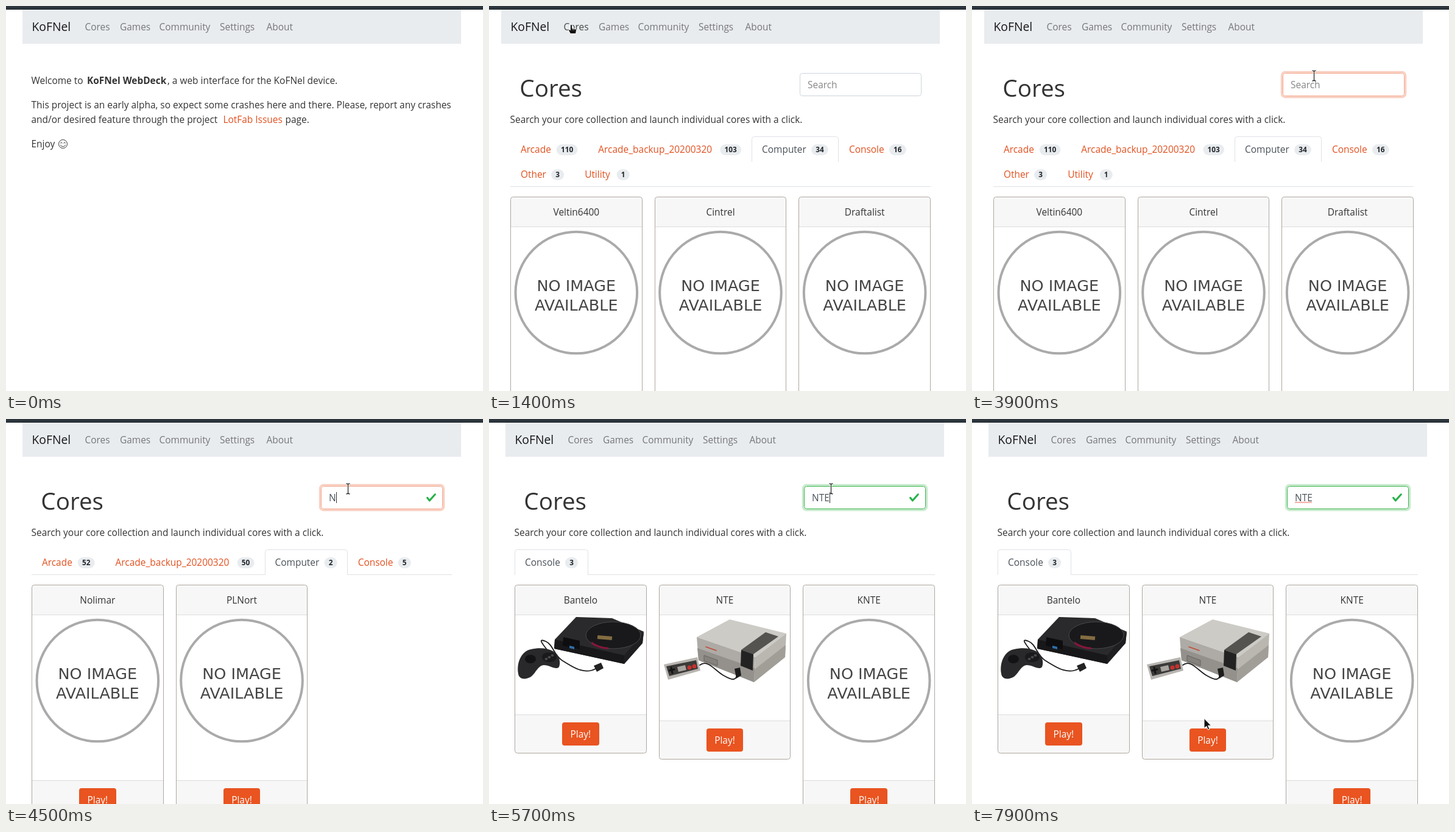
Recreate the animation shown at these times as an HTML page. Size 783x632 px, loop 8000 ms.

```html
<!DOCTYPE html>
<html lang="en">
<head>
<meta charset="utf-8">
<title>Web menu demo</title>
<style>
  html, body { margin: 0; width: 100%; height: 100%; overflow: hidden; background: #fff; }
  svg { display: block; width: 783px; height: 632px; }
  text { font: 15.45px "Open Sans", "Noto Sans", sans-serif; fill: #333; white-space: pre; }
  .mid { text-anchor: middle; }
  .brand { font-size: 19.3px; fill: #151618; }
  .nav { fill: #757678; }
  .title { font-size: 38.6px; }
  .bold { font-weight: 700; }
  .link { fill: #e2501f; }
  .tab { fill: #495057; }
  .badge { font-size: 11.8px; font-weight: 700; fill: #212529; }
  .none { font: 25.5px "DejaVu Sans", sans-serif; fill: #444; }
  .play { fill: #fff; }
  .field { fill: #495057; }
  .hint { fill: #868686; }
</style>
</head>
<body>
<svg id="stage" viewBox="0 0 783 632" xmlns="http://www.w3.org/2000/svg"></svg>
<script>
const LOOP = 8000, STEP = 100;
const ORANGE = [244, 170, 144], GREEN = [56, 180, 74], GREY = [206, 212, 218];
const GLOW = [233, 84, 32];

const text = (x, y, str, cls = '') => `<text x="${x}" y="${y}" class="${cls}">${str}</text>`;
const rect = (x, y, w, h, fill, more = '') =>
  `<rect x="${x}" y="${y}" width="${w}" height="${h}" fill="${fill}" ${more}/>`;
const path = (d, fill, more = '') => `<path d="${d}" fill="${fill}" ${more}/>`;
const line = (d, color, width) =>
  path(d, 'none', `stroke="${color}" stroke-width="${width}" stroke-linecap="round" stroke-linejoin="round"`);
const oval = (x, y, rx, ry, fill, more = '') =>
  `<ellipse cx="${x}" cy="${y}" rx="${rx}" ry="${ry}" fill="${fill}" ${more}/>`;

// All page coordinates below are relative to the left edge of the container.

function navBar() {
  const items = [['Games', 160], ['Community', 224.5], ['Settings', 324], ['About', 400.5]];
  return rect(0, 6, 720, 56, '#e9ecef') + text(15.5, 41, 'KoFNel', 'brand') +
    '<text id="cores" x="102.5" y="40" class="nav">Cores</text>' +
    items.map(([name, x]) => text(x, 40, name, 'nav')).join('');
}

function homePage() {
  return text(14.5, 128, 'Welcome to') + text(106, 128, 'KoFNel WebDeck', 'bold') +
    text(238, 128, ', a web interface for the KoFNel device.') +
    text(14.5, 168, 'This project is an early alpha, so expect some crashes here and there. Please, report any crashes') +
    text(14.5, 192, 'and/or desired feature through the project') +
    text(329.5, 192, 'LotFab Issues', 'link') + text(431.5, 192, 'page.') +
    text(14.5, 232, 'Enjoy') +
    oval(66.5, 226.5, 7, 7, 'none', 'stroke="#333"') +
    line('M62.3 225q1.5-2.4 3 0M67.7 225q1.5-2.4 3 0M62.3 228.3q4.2 5.4 8.4 0', '#333', 1);
}

// Distance from the start of a tab's label to its badge
const LABELS = { Arcade: 58.7, Arcade_backup_20200320: 200, Computer: 81, Console: 66, Other: 50, Utility: 52.5 };

function tabs(list, active) {
  let x = 32, row = 0, out = '', box = '';
  for (const [name, count] of list) {
    const gap = LABELS[name], w = 14.4 + 6.75 * String(count).length;
    if (x + gap + w + 17 > 705) { x = 32; row++; }
    const y = 214 + 41 * row, on = name === active;
    if (on) {
      const l = Math.round(x - 17) + 0.5, r = Math.round(x + gap + w + 16) + 0.5;
      box = path(`M${l} ${y + 42}V${y + 4.5}q0-4 4-4H${r - 4}q4 0 4 4V${y + 42}`, '#fff', 'stroke="#dee2e6"');
    }
    out += text(x, y + 27, name, on ? 'tab' : 'link') +
      rect(x + gap, y + 13, w, 18, '#e9ecef', 'rx="9"') +
      text(x + gap + w / 2, y + 26.3, count, 'badge mid');
    x += gap + w + 34;
  }
  const base = 255 + 41 * row;
  return { base, svg: rect(15, base, 690, 1, '#dee2e6') + box + out };
}

function noImage(cx, top) {
  return oval(cx, top + 157.5, 99.8, 99.8, '#fff', 'stroke="#aaa" stroke-width="4"') +
    text(cx, top + 154.5, 'NO IMAGE', 'none mid') + text(cx, top + 186.5, 'AVAILABLE', 'none mid');
}

function darkConsole() {
  return path('M116 325L175 327L227 349L225 368L195 402L80 377L81 362Z', '#2a2a2c') +
    path('M81 362L195 388L195 402L80 377Z', '#18181a') +
    path('M195 388L227 350L225 368L195 402Z', '#1f1f21') +
    oval(177, 355, 45, 22, '#19191b', 'stroke="#48484c"') +
    path('M141 365Q152 374 169 375V378Q153 377 142 370Z', '#86163c') +
    rect(151, 356, 24, 6, '#846c42', 'transform="rotate(5 163 359)"') +
    path('M95 358l27 6v14l-28-6z', '#0e0e10') + path('M105 372l8 2v4l-8-2z', '#2d6fad') +
    line('M70 381C58 366 54 360 66 365S80 389 94 397S128 421 148 410', '#1b1b1d', 1.8) +
    path('M145 405l12-5 4 9-11 6z', '#222') +
    path('M21 418C18 400 26 381 42 378C55 375 69 376 78 381C89 387 91 400 88 407C83 413 73 404 63 404C53 405 50 417 42 423C32 429 22 427 21 418Z', '#29292b') +
    oval(41, 394, 9, 7, '#131315') + oval(72, 391, 12, 8, '#1a1a1c') +
    oval(67, 394, 2.5, 2, '#4a4a4e') + oval(72, 391, 2.5, 2, '#4a4a4e') + oval(77, 388, 2.5, 2, '#4a4a4e');
}

function greyConsole() {
  return path('M314 358L368 329L461 352L410 391Z', '#cdcbc6') +
    path('M314 358L410 391L408 432L317 396Z', '#aeaba6') +
    path('M410 391L461 352L459 391L408 432Z', '#bab7b1') +
    path('M315 376L409 409L408 432L317 396Z', '#94918c') +
    path('M409 411L460 371L459 391L408 432Z', '#a19e98') +
    path('M427 350L448 357L407 386L387 379Z', '#55534f') +
    path('M387 379L407 386L406 413L386 405Z', '#222') +
    path('M326 388l22 8v9l-22-8z', '#85827d', 'stroke="#66635f" stroke-width="1"') +
    line('M329 374l17 6', '#c04a3a', 1.6) +
    line('M319 404C332 394 344 413 358 421S379 431 381 417', '#1e1e1e', 1.8) +
    path('M376 410l9-2 2 13-8 5z', '#1d1d1d') +
    path('M260 403L315 391L320 413L267 428Z', '#b8b5b1') +
    path('M264 406L313 396L316 410L269 422Z', '#3b3a39') +
    line('M272 408l2 9M269 413l8-2', '#151515', 3) +
    path('M282 407l13-3 2 8-13 3z', '#a7a4a0') +
    oval(302, 408, 3.5, 3.5, '#c5322e') + oval(310, 406, 3.5, 3.5, '#c5322e');
}

const PHOTOS = { Bantelo: [213, darkConsole], NTE: [223, greyConsole] };

function card(name, i, top, left) {
  const start = 15 + 710 / 3 * i, width = 650 / 3, cx = start + width / 2;
  // Edges sit on whole pixels of the stage
  const snap = x => Math.round(x + left) - left;
  const x = snap(start), w = snap(start + width) - x;
  const [foot, photo] = PHOTOS[name] || [321, () => noImage(cx, top)];
  const height = foot + 64, inner = w - 10;
  const playX = snap(cx - 30.2), playW = snap(cx + 30.2) - playX;
  return rect(x + 0.5, top + 0.5, w - 1, height - 1, '#fff', 'rx="4"') +
    path(`M${x + 1} ${top + 49}v-44q0-4 4-4h${inner}q4 0 4 4v44z`, '#f7f7f7') +
    path(`M${x + 1} ${top + foot}v59q0 4 4 4h${inner}q4 0 4-4v-59z`, '#f7f7f7') +
    rect(x + 1, top + 49, w - 2, 1, '#dcdcdc') + rect(x + 1, top + foot, w - 2, 1, '#dcdcdc') +
    photo() + text(cx, top + 31, name, 'mid') +
    rect(playX, top + foot + 13, playW, 38, '#e95420', 'rx="4"') +
    text(cx, top + foot + 38, 'Play!', 'play mid') +
    rect(x + 0.5, top + 0.5, w - 1, height - 1, 'none', 'rx="4" stroke="#aea79f"');
}

const VIEWS = [
  { at: 0, left: 27 },
  { at: 1400, left: 20, active: 'Computer', cards: ['Veltin6400', 'Cintrel', 'Draftalist'],
    tabs: [['Arcade', 110], ['Arcade_backup_20200320', 103], ['Computer', 34], ['Console', 16], ['Other', 3], ['Utility', 1]] },
  { at: 4500, left: 27, active: 'Computer', cards: ['Nolimar', 'PLNort'], typed: 'N',
    tabs: [['Arcade', 52], ['Arcade_backup_20200320', 50], ['Computer', 2], ['Console', 5]] },
  { at: 4900, left: 27, active: 'Arcade', cards: ['BolmantaRider'], typed: 'NT', fade: true,
    tabs: [['Arcade', 1], ['Arcade_backup_20200320', 1], ['Console', 4]] },
  { at: 5700, left: 27, active: 'Console', cards: ['Bantelo', 'NTE', 'KNTE'], typed: 'NTE',
    tabs: [['Console', 3]] }
];

function viewBody(view) {
  if (!view.tabs) return homePage();
  const { base, svg } = tabs(view.tabs, view.active);
  const cards = view.cards.map((name, i) => card(name, i, base + 17, view.left)).join('');
  return svg + `<g class="cards">${cards}</g>`;
}

function searchHead() {
  const tick = 'M2.3 6.7L.6 4.5C.2 3.5 1 3.1 1.7 3.7L2.8 5.1 6.2 1.3C6.8.7 7.8 1.1 7.4 2L3.4 6.6C3 7.1 2.6 7 2.3 6.7Z';
  return text(30.3, 149, 'Cores', 'title') +
    text(14.5, 192, 'Search your core collection and launch individual cores with a click.') +
    rect(488.4, 108.4, 203.2, 41.2, 'none', 'id="ring" rx="5.6" stroke-width="3.2"') +
    rect(490.5, 110.5, 199, 37, '#fff', 'id="box" rx="4"') +
    '<text id="field" x="503" y="135"></text>' +
    `<g id="tick">${path(tick, '#28b14a', 'transform="translate(662 120) scale(2.25)"')}</g>` +
    `<g id="wave">${line('M503.5 137.6' + 'l1.5-1.4 1.5 1.4'.repeat(9), '#e0402c', 0.9)}</g>` +
    rect(0, 120, 1, 18, '#333', 'id="caret"');
}

const BEAM = 'M-2.8-8.5Q0-8.5 0-6.5V6.5Q0 8.5-2.8 8.5M2.8-8.5Q0-8.5 0-6.5M0 6.5Q0 8.5 2.8 8.5';
const CURSORS = {
  arrow: path('M0 0V16.2L3.9 12.8L6.4 18.6L9 17.5L6.5 11.8H11.6Z', '#111', 'stroke="#fff" stroke-width="1"'),
  hand: path('M-1.6 0.3q1.6-1.8 3.2 0V5.5L6.8 6.7q1.8.5 1.6 2.5L7.6 14.5H-1.4L-4.4 9.3q-.6-1.8 1-1.7l1.8 1z',
    '#111', 'stroke="#fff" stroke-width="1"') + line('M2 6v2.4M4.4 6.8v2', '#fff', 0.6),
  beam: line(BEAM, '#fff', 2.6) + line(BEAM, '#111', 1.1)
};

const stage = document.getElementById('stage');
stage.innerHTML = `<g id="page">${navBar()}<g id="head">${searchHead()}</g>` +
  VIEWS.map((v, i) => `<g id="view${i}">${viewBody(v)}</g>`).join('') + '</g>' +
  `<g id="pointer">${Object.entries(CURSORS).map(([id, svg]) => `<g id="${id}">${svg}</g>`).join('')}</g>` +
  rect(0, 0, 783, 6, '#2b353b') + rect(0, 5, 783, 1, '#1d2529');

const $ = id => document.getElementById(id);
const show = (id, on) => $(id).setAttribute('display', on ? 'inline' : 'none');
const set = (id, attrs) => Object.entries(attrs).forEach(([k, v]) => $(id).setAttribute(k, v));
const clamp = v => Math.max(0, Math.min(1, v));
const smooth = p => p * p * (3 - 2 * p);
const mix = (a, b, p) => a.map((v, i) => v + (b[i] - v) * p);
const rgb = (c, a = 1) => `rgba(${c.map(Math.round)},${a})`;

// Start time, number of steps, start point, end point
const MOVES = [
  [500, 5, [92, -4], [135, 31]],
  [2100, 4, [135, 31], [319, 152]],
  [2800, 3, [319, 152], [561.5, 114.5]],
  [7100, 5, [561.5, 114.5], [392, 409.5]],
  [7800, 2, [392, 409.5], [381, 491.5]]
];
// On time, off time, place
const CARETS = [[3300, 3900, 503], [4500, 4900, 515], [4900, 5500, 524], [5700, 6300, 532], [6900, 7500, 532]];

function drawPointer(t) {
  const move = MOVES.filter(m => t >= m[0]).pop();
  show('pointer', move);
  if (!move) return;
  const [start, steps, from, to] = move;
  const [x, y] = mix(from, to, smooth(clamp(((t - start) / STEP + 1) / steps)));
  const onLink = x > 121 && x < 171 && y > 14 && y < 54;
  const onField = x > 510 && x < 717 && y > 110 && y < 148;
  show('hand', onLink);
  show('beam', onField);
  show('arrow', !onLink && !onField);
  set('pointer', { transform: `translate(${x} ${y})` });
}

function drawField(t, typed) {
  const focus = clamp((t - 3300 + 30) / 200), valid = clamp((t - 4500) / 200);
  set('box', { stroke: rgb(mix(mix(GREY, ORANGE, focus), GREEN, valid)) });
  set('ring', { stroke: rgb(mix(GLOW, GREEN, valid), 0.27 * focus) });
  $('field').textContent = typed || 'Search';
  set('field', { class: typed ? 'field' : 'hint' });
  show('tick', typed);
  show('wave', t >= 6700);
  const caret = CARETS.find(([on, off]) => t >= on && t < off);
  show('caret', caret);
  if (caret) set('caret', { x: caret[2] });
}

function draw(ms) {
  const t = Math.floor((ms % LOOP) / STEP) * STEP;
  const view = VIEWS.filter(v => t >= v.at).pop();
  VIEWS.forEach((v, i) => show('view' + i, v === view));
  set('page', { transform: `translate(${view.left} 0)` });
  show('head', view.tabs);
  $('cores').style.fill = t >= 800 && t < 3300 ? '#464748' : '';
  if (view.fade) {
    const cards = $('view' + VIEWS.indexOf(view)).querySelector('.cards');
    cards.setAttribute('opacity', clamp((t - view.at + STEP) / 300));
  }
  drawField(t, view.typed);
  drawPointer(t);
}

let begin;
function tick(now) {
  begin ??= now;
  draw(now - begin);
  requestAnimationFrame(tick);
}
draw(0);
requestAnimationFrame(tick);
</script>
</body>
</html>
```
